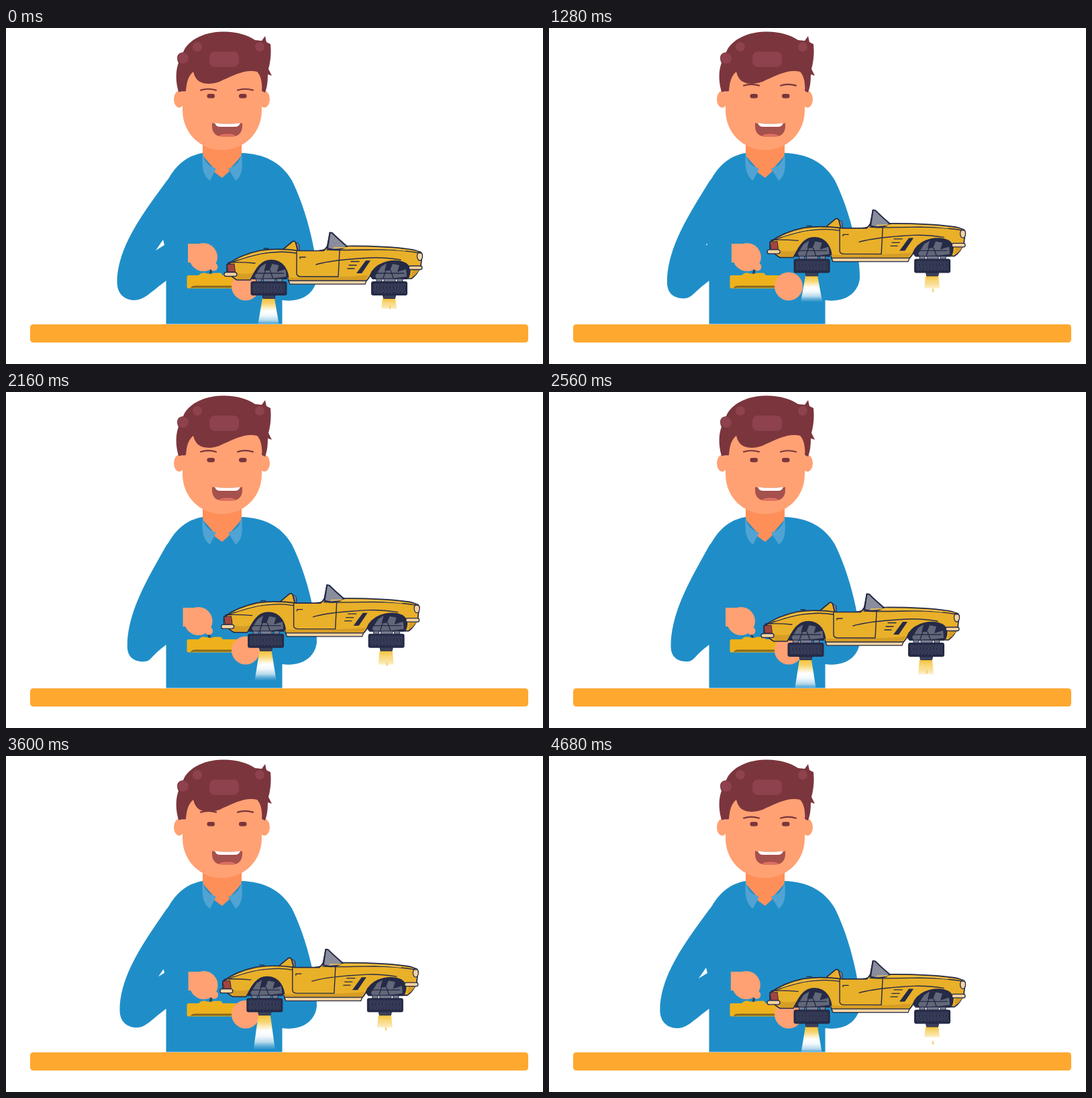
Animation of 800 by 500 pixels, one loop 4.72 s. Source, as an HTML page:

```html
<!DOCTYPE html>
<html lang="en">
<head>
<meta charset="utf-8">
<title>Hover car</title>
<style>
  html, body { margin: 0; width: 100%; height: 100%; overflow: hidden; background: #fff; }
  svg { display: block; }
  .shirt { fill: #1f8ec8; }
  .skin { fill: #ffa173; }
  .hair { fill: #7b353d; }
  .shine { fill: #8e424d; }
  .collar { fill: #50a3d3; }
  .ink { fill: #252a47; }
  .steel { fill: #626779; }
  .paint { fill: #e9b029; stroke: #252a47; stroke-width: 1.7; stroke-linejoin: round; }
  .shade { fill: #d59d25; }
  .trim { fill: #f4d3a0; stroke: #252a47; stroke-width: 1.3; }
  .line { fill: none; stroke: #252a47; stroke-width: 1.4; stroke-linecap: round; stroke-linejoin: round; }
</style>
</head>
<body>
<svg width="800" height="500" viewBox="0 0 800 500">
  <defs>
    <linearGradient id="longFire" x2="0" y2="1">
      <stop offset="0" stop-color="#f4c23a"/>
      <stop offset=".2" stop-color="#f8d573"/>
      <stop offset=".34" stop-color="#fdeebf"/>
      <stop offset=".46" stop-color="#fff"/>
      <stop offset=".62" stop-color="#f2f8fc"/>
      <stop offset=".8" stop-color="#b5d9ec"/>
      <stop offset="1" stop-color="#6fb5da" stop-opacity=".2"/>
    </linearGradient>
    <linearGradient id="shortFire" x2="0" y2="1">
      <stop offset="0" stop-color="#f4c23a"/>
      <stop offset=".4" stop-color="#f8d778"/>
      <stop offset=".75" stop-color="#fae2a0"/>
      <stop offset="1" stop-color="#fdf1cf"/>
    </linearGradient>
    <pattern id="tread" width="5" height="22" y="377" patternUnits="userSpaceOnUse">
      <path d="M0,3 L3,9 L0,17 M3,3 L5,9 L3,18" fill="none" stroke="#4d526a" stroke-width=".9"/>
    </pattern>
    <g id="wheel">
      <path class="ink" d="M-25,374 L-30,368 C-26,352 -14,344 3,344 C20,344 31,354 32,362 L27,374Z"/>
      <path class="steel" d="M-21,369 L-12,355 -4,350 -7,361 1,361 5,351 15,353 12,363 25,359 26,370 9,372 -19,373Z"/>
      <path class="line" d="M-9,372 L-1,349 M6,372 L2,361 M-20,365 H22"/>
      <path fill="#777c8d" stroke="#252a47" d="M-19,373 H-11 V378 H-19Z M-8,373 H9 V378 H-8Z M12,373 H20 V378 H12Z"/>
      <rect class="ink" x="-27" y="377" width="54" height="21" rx="3"/>
      <rect x="-24" y="379" width="48" height="17" fill="url(#tread)"/>
      <path fill="#3d425a" stroke="#252a47" d="M-9.500,398 H9.500 L8.500,402.500 H-8.500Z"/>
    </g>
  </defs>

  <!-- torso and arms -->
  <path class="shirt" d="M293,186 C263,191 248,212 238.500,231 V440.500 H411.500 V405 C440,409 461,395 463,372 C463,350 459,326 452,299 C444,268 434,243 426,227 C410,199 383,187 351,186Z"/>
  <path class="shirt" id="arm"/>
  <path id="gap" fill="#fff"/>

  <!-- neck and collar -->
  <path fill="#ff8f59" d="M293,160 H351 V190 L336,207 332,214 322,223 311,215 308,207 293,190Z"/>
  <path class="collar" d="M293,186 C291,207 294,221 304,227 L313,209 Q296,205 293,186Z M351,186 C353,207 352,221 342,227 L331,209 Q348,205 351,186Z"/>

  <!-- head -->
  <g class="skin">
    <ellipse cx="258" cy="106" rx="8" ry="12.5"/>
    <ellipse cx="385" cy="106" rx="8" ry="12.5"/>
    <path d="M263,55 V122 C263,157 290,181.500 322,181.500 C354,181.500 381,157 381,122 V55Z"/>
  </g>
  <g id="brows" fill="none" stroke="#7b353d" stroke-width="2.200" stroke-linecap="round">
    <path d="M290,92.500 Q301,89 313,92.500 M345,92.500 Q356,89 368,92.500"/>
  </g>
  <path class="hair" d="M257,95 C252,78 253,62 257,52 C253,44 255,37 264,36 C270,20 292,6 322,5.500 C343,5 359,10 371,18 L381,19 386,12 388,21 394,24 Q396,43 391,61 L396,71 390,69 C390,80 389,88 386,96 L381,94 C382,82 380,71 374,65 C358,61 342,69 324,77 C308,86 290,84 284,76 Q280,71 279,65 C270,73 269,83 268,94Z"/>
  <g class="shine">
    <rect x="303" y="35" width="44" height="23" rx="8"/>
    <circle cx="264" cy="45" r="8"/>
    <circle cx="285" cy="28" r="7"/>
    <circle cx="378" cy="28" r="7"/>
  </g>
  <g class="hair">
    <rect x="299.500" y="98" width="11.500" height="6.500" rx="3.200"/>
    <rect x="347" y="98" width="11.500" height="6.500" rx="3.200"/>
  </g>
  <path fill="#a5514d" d="M307,141.500 Q330,144 352,141.500 V146 C352,156 346,161.500 337,161.500 H322 C313,161.500 307,156 307,146Z"/>
  <path fill="#fff" d="M311,141.500 Q330,144 349,141.500 Q347,147 341,147 H319 Q313,147 311,141.500Z"/>
  <path fill="#dc6f62" d="M317,160.500 Q321,157 330,157.500 Q339,157 342,160.500 L337,161.500 H322Z"/>

  <!-- remote control and hands -->
  <path id="stick" fill="none" stroke="#333a4c" stroke-width="3"/>
  <path fill="#eeb11c" d="M272,368 H287 Q291,363 297,364.500 Q304,367 310,364.500 H320 L323,368 H350 V387.500 H272 Q269.500,387.500 269.500,385 V371 Q269.500,368 272,368Z"/>
  <path fill="#86691f" d="M275,387.500 Q276,383.500 282,383.500 H345 V386.500 H283 Q278,386 275,387.500Z"/>
  <g class="skin" id="hand">
    <path d="M271,321 H293 V355 L284,349 H271Z"/>
    <circle cx="294" cy="341" r="21"/>
    <circle cx="309.500" cy="355.500" r="6"/>
  </g>
  <circle class="skin" cx="357" cy="384.500" r="21"/>

  <g id="car">
    <path id="rearFire" fill="url(#longFire)"/>
    <path id="frontFire" fill="url(#shortFire)"/>
    <rect id="spark" x="571" width="2" height="5" fill="#f3cd67"/>

    <!-- chassis -->
    <use href="#wheel" x="391.500"/>
    <use href="#wheel" x="571"/>
    <path fill="#777c8e" stroke="#252a47" d="M428,331 L431,320 Q436,319 437,324 V332Z"/>
    <path class="paint" d="M412,330 L427,317.500 Q431,316 432,321 L435,333Z"/>
    <path class="paint" d="M329,352 Q350,337 379,331 Q405,327 437,331.500 H473 Q476,329 478,325.500 L507,324.500 Q562,324 600,329 Q617,331 620,337 L618,354 Q613,367 604,373 L599,373 Q606,357 595,350 C580,343 556,347 545,363 Q541,373 536,377 H421 C421,361 413,346 396,345.500 C379,345 372,360 364,375 H344 Q334,369 329,362Z"/>
    <path class="shade" d="M342,364 Q357,368 369,364 L363,374 H345Z M420,371 Q470,373 540,368 L535,376 H422Z M606,359 H616 Q611,368 604,371Z"/>
    <path class="trim" d="M421,376 H537 L535,381.200 H423Z"/>
    <path fill="#a5443f" stroke="#252a47" d="M329,352 L340,351 341.500,363 331,363Z"/>
    <rect class="trim" x="325" y="363.500" width="19" height="6" rx="3"/>
    <rect class="trim" x="600" y="354" width="20" height="5.500" rx="2.700"/>
    <ellipse class="trim" cx="616.500" cy="339.500" rx="4" ry="6.500"/>

    <!-- windshield -->
    <path fill="#8a8d9c" stroke="#252a47" stroke-width="2" stroke-linejoin="round" d="M482.500,304.500 L486,305 Q495,314 508,325 Q500,330 488,330 L479,328Z"/>
    <path class="line" stroke-width="2" d="M482.500,304.500 L478,327 Q475,331 467,331"/>

    <!-- body details -->
    <path class="line" d="M331,351 Q352,342 379,336 Q411,331 432,335 M478,330 Q505,331 540,330 Q585,329 618,335 M433,332 V366 Q434,370 440,370 H495 L497,331 M438,341 H446 M438,341 V343 M462,352 Q485,345 543,342 Q562,341 588,345 M331,349 Q350,348 371,350 M384,328 H391"/>
    <path class="line" stroke-width="1.100" d="M514,347.500 H526 M511,353 H522 M509,358 H519"/>
    <path class="ink" d="M522,365 L536,346 H543 L530,365Z"/>
    <path d="M488,327 Q550,326 595,331 M346,344 Q372,334 404,331" fill="none" stroke="#f3c44c" stroke-width="1.500"/>
  </g>

  <rect x="36" y="441" width="742" height="27" rx="4.500" fill="#ffa830"/>
</svg>
<script>
const LOOP = 4720, STEP = 40;
const TIMES = [0, 720, 1800, 2560, 3160, 4040];
const TRACKS = {
  carX: [0, 0, -1, -9, -13, 1],
  carY: [0, -29, -30, -4, -20, -10],
  hand: [0, 6, -5, -8, -1, 1],
  elbow: [0, 7, 13, 16, 8, 1],
  brow: [0, -8, -4.5, -3.5, -8, -8],
  rear: [40, 34, 42, 44, 48, 50],
  front: [15, 17, 19, 21, 20, 16]
};
const $ = id => document.getElementById(id);
const set = (id, name, value) => $(id).setAttribute(name, value);
const move = (id, x, y) => set(id, 'transform', `translate(${x} ${y})`);

// Cyclic smooth curve through the values of a track
function at(values, t) {
  const n = TIMES.length;
  const time = i => TIMES[(i + n) % n] + Math.floor(i / n) * LOOP;
  const value = i => values[(i + n) % n];
  const slope = i => (value(i + 1) - value(i - 1)) / (time(i + 1) - time(i - 1));
  let i = n - 1;
  while (TIMES[i] > t) i--;
  const span = time(i + 1) - time(i), u = (t - time(i)) / span, v = 1 - u;
  return v * v * (1 + 2 * u) * value(i) + u * u * (3 - 2 * u) * value(i + 1)
    + span * u * v * (v * slope(i) - u * slope(i + 1));
}

function flame(id, x, top, bottom, length) {
  set(id, 'd', `M${x - top},402.5 H${x + top} L${x + bottom},${403 + length} H${x - bottom}Z`);
}

function draw(t) {
  const p = {};
  for (const key in TRACKS) p[key] = at(TRACKS[key], t);

  const e = p.elbow, low = 405 - e / 4;
  set('arm', 'd', `M262,203 L239,228 C${207 + e / 2},272 ${165.5 + e},325 ${165.5 + e},378
    C${165.5 + e},396 ${177 + e},${low} ${191 + .9 * e},${low}
    C${206 + .7 * e},${low} 214,394 240,375 L262,330Z`);
  const g = Math.max(0, 1 - e / 13);
  set('gap', 'd', `M${236 - 13 * g},${322 + 9 * g} L${236 - 2 * g},${322 - 7 * g} L236,${322 + g}Z`);

  move('hand', p.hand, 0);
  set('stick', 'd', `M304,367 L${307 + p.hand},355`);
  move('brows', 0, p.brow);
  move('car', p.carX, p.carY);
  flame('rearFire', 391, 9, 16, p.rear);
  flame('frontFire', 570.5, 9.5, 11.5, p.front);
  set('spark', 'y', 413 + t % 472 / 40);
}

function tick(now) {
  draw(Math.floor(now % LOOP / STEP) * STEP);
  requestAnimationFrame(tick);
}
draw(0);
requestAnimationFrame(tick);
</script>
</body>
</html>
```
